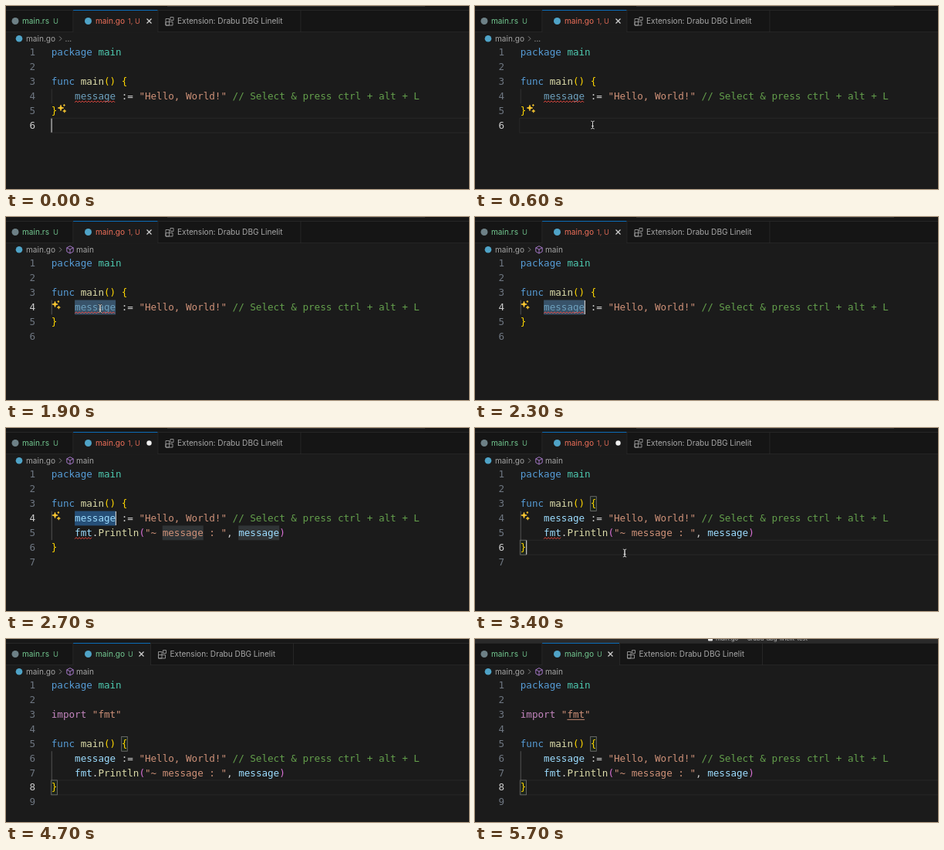
An HTML page that plays this animation: 600x237 px, repeating every 5.8 s.

```html
<!DOCTYPE html>
<html lang="en">
<head>
<meta charset="utf-8">
<title>Editor loop</title>
<style>
html, body { margin: 0; width: 100%; height: 100%; overflow: hidden; background: #1b1b1b; }
svg { display: block; width: 100vw; height: 100vh; }
text { white-space: pre; }
.code { font: 12.58px "DejaVu Sans Mono", "Liberation Mono", monospace; }
.ui { font: 10.1px Inter, Roboto, sans-serif; }
</style>
</head>
<body>
<svg id="stage" viewBox="0 0 600 237"></svg>
<script>
const LOOP = 5800, STEP = 100;
const LEFT = 58.8, TOP = 51, ROW = 18.85, CHAR = 7.574;

// Moments at which the editor changes
const AT = {
  clickBrace: 700, clickWord: 1100, select: 1200, crumb: 1300, bulb: 1500,
  insert: 2400, clickEnd: 3200, save: 4000, clean: 4200,
  bar: 4400, title: 4800, link: 5200
};

const C = {
  key: '#569cd6', pkg: '#4ec9b0', fn: '#dcdcaa', gold: '#ffd700', pink: '#da70d6',
  ctl: '#c586c0', str: '#ce9178', note: '#64a04c', id: '#9cdcfe', dim: '#6da0bd',
  txt: '#d0d0d0', green: '#73c991', err: '#ee6f59', grey: '#9d9d9d', go: '#4fa3c7'
};

const stage = document.getElementById('stage');
const colX = c => LEFT + c * CHAR;
const rowY = r => TOP + (r - 1) * ROW;
const rect = (x, y, w, h, fill, more = '') =>
  `<rect x="${x}" y="${y}" width="${w}" height="${h}" fill="${fill}" ${more}/>`;
const path = (d, stroke, w = 1, fill = 'none') =>
  `<path d="${d}" fill="${fill}" stroke="${stroke}" stroke-width="${w}"/>`;
const dot = (x, y, r, fill) => `<circle cx="${x}" cy="${y}" r="${r}" fill="${fill}"/>`;
const label = (x, y, s, fill, more = '') =>
  `<text class="ui" x="${x}" y="${y}" fill="${fill}" ${more}>${s}</text>`;
const cells = (col, row, n, fill, more = '') =>
  rect(colX(col), rowY(row), n * CHAR, ROW, fill, more);

function codeRow(row, tokens) {
  const spans = tokens.map(([s, c]) => `<tspan fill="${C[c]}">${s}</tspan>`).join('');
  return `<text class="code" x="${LEFT}" y="${rowY(row) + 13.4}">${spans}</text>`;
}

function squiggle(col, row, n) {
  const y = rowY(row) + 16.3;
  let d = `M${colX(col)} ${y + 1}`;
  for (let i = 1; i * 2 <= n * CHAR; i++) d += `l2 ${i % 2 ? -2 : 2}`;
  return path(d, '#e5483f', 1);
}

function star(x, y, r) {
  const k = r * 0.24;
  return path(`M${x} ${y - r}L${x + k} ${y - k}L${x + r} ${y}L${x + k} ${y + k}` +
    `L${x} ${y + r}L${x - k} ${y + k}L${x - r} ${y}L${x - k} ${y - k}Z`, '#ffcc33', 0.7, '#ffcc33');
}

const sparkle = (x, y) => star(x - 1, y - 0.5, 3.8) + star(x + 3.8, y + 3.6, 2.1) + star(x + 3.4, y - 4, 1.2);

function ibeam([x, y]) {
  const d = `M${x - 2.2} ${y - 5}q2.2 0 2.2 1.5v7q0 1.5 -2.2 1.5` +
    `M${x + 2.2} ${y - 5}q-2.2 0 -2.2 1.5v7q0 1.5 2.2 1.5M${x - 1.4} ${y + 1.5}h2.8`;
  return path(d, '#111', 2.2) + path(d, '#d8d8d8', 1);
}

// Pointer runs: each is a list of [time, x, y], then the time it hides
const runs = [
  { keys: [[500, 165, 172], [700, 140, 136], [1000, 122, 118.5]], until: 2300 },
  { keys: [[2700, 122, 118.5], [3000, 194, 162]], until: AT.save }
];

function pointer(t) {
  const run = runs.find(r => t >= r.keys[0][0] && t < r.until);
  if (!run || t === 2700) return null;
  const i = run.keys.findIndex(k => k[0] > t);
  if (i < 0) return run.keys[run.keys.length - 1].slice(1);
  const [t0, x0, y0] = run.keys[i - 1], [t1, x1, y1] = run.keys[i];
  const p = (t - t0) / (t1 - t0), e = p * p * (3 - 2 * p);
  return [x0 + (x1 - x0) * e, y0 + (y1 - y0) * e];
}

// Caret stops: [since, column, row]
const carets = [
  [0, 0, 6], [AT.clickBrace, 1, 5], [AT.clickWord, 8, 4], [AT.select, 11, 4],
  [AT.insert, 11, 4], [AT.clickEnd, 1, 6], [AT.save, 1, 8]
];
const caretAt = t => carets.filter(c => c[0] <= t).pop();

function cross(x, y) {
  return path(`M${x - 3} ${y - 3}l6 6m0 -6l-6 6`, '#d8d8d8', 1.1);
}

function chevron(x) {
  return path(`M${x - 1.5} 39.3l3 3l-3 3`, '#8a8a8a', 0.9);
}

function extensionIcon(x) {
  return path(`M${x - 5} 16.5h4.5v8.5h-4.5zM${x - 5} 20.6h9v4.4h-9zM${x + 1} 14.5h4v4h-4z`, '#9a9a9a', 0.9);
}

function chrome(t) {
  const clean = t >= AT.clean, dirty = t >= AT.insert && t < AT.save;
  const end = clean ? 187 : 196.5, ext = end + 185;
  const tone = clean ? C.green : C.err, line = '#2b2b2b';
  let s = rect(0, 0, 600, 34, '#151515');
  s += rect(0, 0, 600, 5, t < AT.bar ? '#171717' : t < AT.title ? '#181818' : '#2a2a2a');
  if (t < AT.bar) s += rect(209, 0, 334, 0.8, '#3a3a3a');
  if (t >= AT.title) {
    s += rect(302, -3, 6, 5.5, '#e8e8e8', 'rx="1"');
    s += label(312, 2, 'main.go — drabu-dbg-linelit-test', '#b8b8b8', 'style="font-size:7.7px"');
  }
  s += rect(0, 5, 600, 0.8, line) + rect(0, 33.3, 600, 0.8, line);
  s += rect(87, 5.8, end - 87, 28.5, '#1b1b1b') + rect(87, 5, end - 87, 1, '#0c6cb8');
  s += [86.5, end, ext].map(x => rect(x, 5.5, 0.8, 28.5, line)).join('');

  s += dot(12, 19.5, 4.5, '#6d8086') + label(21, 23, 'main.rs', C.green);
  s += label(61, 23, 'U', C.green, 'opacity=".85" style="font-size:9.4px"');
  s += dot(106.5, 19.5, 4.5, C.go) + label(116, 23, 'main.go', tone);
  s += label(158, 23, clean ? 'U' : '1, U', tone, 'opacity=".85" style="font-size:9.2px"');
  s += dirty ? dot(185.5, 19.5, 3.2, '#f0f0f0') : cross(clean ? 175.5 : 185.5, 19.5);
  s += extensionIcon(end + 15.5);
  s += label(end + 25.5, 23, 'Extension: Drabu DBG Linelit', '#a8a8a8', 'font-style="italic"');

  s += dot(17, 42.3, 4.3, C.go) + label(26, 45.8, 'main.go', '#a4a4a4') + chevron(70.5);
  if (t < AT.crumb) return s + label(76.5, 45.8, '...', '#a4a4a4');
  return s + path('M83 37.6l4.2 2.2v5l-4.2 2.3l-4.2 -2.3v-5zM78.8 39.8l4.2 2.2l4.2 -2.2M83 42v5', '#b180d7', 0.9) +
    label(91, 45.8, 'main', '#a4a4a4');
}

function program(t) {
  const inserted = t >= AT.insert, saved = t >= AT.save;
  const rows = [[['package ', 'key'], ['main', 'pkg']], []];
  if (saved) rows.push([['import ', 'ctl'], ['"fmt"', 'str']], []);
  rows.push([['func ', 'key'], ['main', 'fn'], ['() {', 'gold']]);
  rows.push([['    message', inserted ? 'id' : 'dim'], [' := ', 'txt'], ['"Hello, World!"', 'str'],
    [' // Select &amp; press ctrl + alt + L', 'note']]);
  if (inserted) {
    rows.push([['    fmt', 'id'], ['.', 'txt'], ['Println', 'fn'], ['(', 'pink'],
      ['"~ message : "', 'str'], [', ', 'txt'], ['message', 'id'], [')', 'pink']]);
  }
  rows.push([['}', 'gold']], []);
  return rows;
}

function editor(t) {
  const rows = program(t), [since, col, row] = caretAt(t);
  const open = t >= AT.save ? 5 : 3, close = rows.length - 1;
  const selected = t >= AT.select && t < AT.clickEnd;
  const matched = (t >= AT.clickBrace && t < AT.select) || t >= AT.clickEnd;
  const inserted = t >= AT.insert;
  let s = '';

  if (!selected) {
    s += rect(LEFT - 1, rowY(row), 545, ROW, 'none', 'stroke="#292929" stroke-width=".9"');
  } else {
    s += cells(4, 4, 7, inserted ? '#264f78' : '#38536a');
    if (inserted) s += cells(19, 5, 7, '#303436') + cells(32, 5, 7, '#303436');
  }
  const guide = row > open && row <= close ? '#606060' : '#393939';
  s += rect(LEFT, rowY(open + 1), 0.8, (close - open - 1) * ROW, guide);
  if (matched) {
    const frame = 'stroke="#777" stroke-width=".8"';
    s += cells(12, open, 1, '#1b231b', frame) + cells(0, close, 1, '#1b231b', frame);
  }

  rows.forEach((tokens, i) => {
    const n = i + 1;
    s += `<text class="code" x="38" y="${rowY(n) + 13.4}" text-anchor="end" fill="${n === row ? '#cccccc' : '#6e7681'}">${n}</text>`;
    s += codeRow(n, tokens);
  });

  if (!inserted) s += squiggle(4, 4, 7);
  else if (t < AT.save) s += squiggle(4, 5, 3);
  if (t >= AT.link) s += rect(colX(8), rowY(3) + 15.2, 3 * CHAR, 0.9, C.str);

  if (t < AT.bulb) s += sparkle(72, 132.5);
  else if (t < AT.save) s += sparkle(64.5, 113.5);

  if ((t - since) % 1000 < 500) s += rect(colX(col) - 0.3, rowY(row) + 0.4, 1.2, ROW - 0.8, '#c4c4c4');
  return s;
}

let shown = -1;
function draw(now) {
  const t = Math.floor((now % LOOP) / STEP) * STEP;
  if (t !== shown) {
    shown = t;
    const p = pointer(t);
    stage.innerHTML = rect(0, 0, 600, 237, '#1b1b1b') + chrome(t) + editor(t) + (p ? ibeam(p) : '');
  }
}

const start = performance.now();
function tick() {
  draw(performance.now() - start);
  requestAnimationFrame(tick);
}
tick();
</script>
</body>
</html>
```
